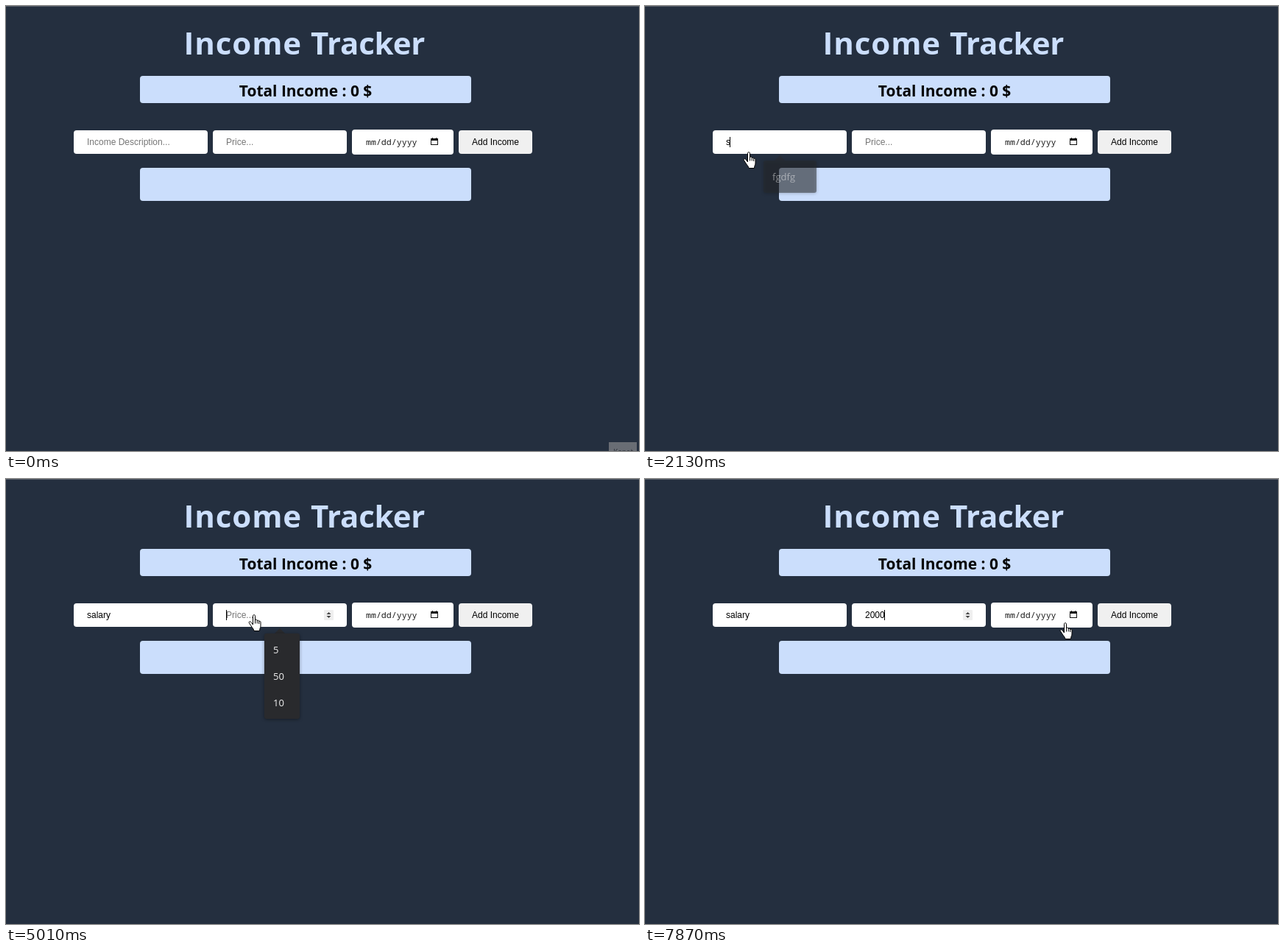
These frames come from a looping animation (860 px wide and 605 px high, 8 s). An HTML page with a canvas:

```html
<!DOCTYPE html>
<html lang="en">
<head>
<meta charset="utf-8">
<title>Income Tracker</title>
<style>
html, body { margin: 0; width: 100%; height: 100%; overflow: hidden; background: #242f3f; }
canvas { display: block; }
</style>
</head>
<body>
<canvas id="stage" width="860" height="605"></canvas>
<script>
const ctx = document.getElementById('stage').getContext('2d');
const LOOP = 8000;
const UI = '12px "Liberation Sans", Arial, sans-serif';
const MENU = '13px "Open Sans", "Noto Sans", sans-serif';
const MONO = '11.6px "Noto Sans Mono", "DejaVu Sans Mono", monospace';
const bold = size => `bold ${size}px "Open Sans", "Noto Sans", sans-serif`;

const HAND = new Path2D('M6 14V2.2C6 .2 9 .2 9 2.2V8C9 6.6 11.7 6.8 11.7 8.4V9C11.7 7.7 14.2 7.9 14.2 9.4V10C14.2 8.9 16.5 9 16.5 10.6V16C16.5 18 15 19 15 22.5H7.5C7.5 20 4.5 18 3 15L.8 11.6C0 10 2 9 3.4 10.6Z');
const KNUCKLES = new Path2D('M9 8V12.5M11.7 9V12.5M14.2 10V13');
const ARROW = new Path2D('M.5 .5V17.5L4.5 13.7L7.2 19.7L9.8 18.6L7.2 12.8H12.5Z');

// Each track holds [start time, value...]; values hold until the next entry.
const cursorTrack = [
  [0, ''],
  [140, 'arrow', 560, 450], [270, 'arrow', 210, 300], [410, 'arrow', 68, 228], [540, 'hand', 145, 174],
  [860, 'hand', 145, 180], [1000, 'hand', 144, 185.5], [1270, 'hand', 143, 190],
  [1410, 'hand', 142, 195], [1550, 'hand', 141, 198], [3860, 'hand', 139, 198],
  [4160, 'arrow', 170, 206], [4300, 'arrow', 280, 228], [4440, 'arrow', 354, 233],
  [4570, 'hand', 342, 192], [4720, 'hand', 337, 184],
  [7430, 'hand', 362, 190], [7570, 'hand', 470, 199], [7720, 'hand', 520, 200], [7870, 'hand', 571, 195]
];
const descTrack = [[0, ''], [2130, 's'], [2260, 'sa'], [2700, 'sal'], [2840, 'sala'], [3160, 'salar'], [3290, 'salary']];
const priceTrack = [[0, ''], [6010, '2'], [6290, '20'], [6440, '200'], [6580, '2000']];
const caretTrack = [
  [0, ''], [1000, 'desc'], [1410, ''], [1830, 'desc'], [3860, ''], [4440, 'desc'],
  [4720, 'price'], [5440, ''], [6010, 'price'], [7150, ''], [7430, 'price']
];
const descMenuTrack = [[0, 0], [1000, 0.5], [1130, 1], [2130, 0.5], [2260, 0]];
const priceMenuTrack = [[0, 0], [4720, 0.6], [5010, 1], [6010, 0.5], [6150, 0]];

function at(track, t) {
  let hit = track[0];
  for (const step of track) if (step[0] <= t) hit = step;
  return hit.slice(1);
}

function box(x, y, w, h, color, r = 4) {
  ctx.fillStyle = color;
  ctx.beginPath();
  ctx.roundRect(x, y, w, h, r);
  ctx.fill();
}

function text(str, x, y, font, color, align = 'left', spacing = 0) {
  ctx.font = font;
  ctx.fillStyle = color;
  ctx.textAlign = align;
  ctx.letterSpacing = spacing + 'px';
  ctx.fillText(str, x, y);
}

function triangle(x, y, half, h, color) {
  ctx.fillStyle = color;
  ctx.beginPath();
  ctx.moveTo(x, y);
  ctx.lineTo(x - half, y + h);
  ctx.lineTo(x + half, y + h);
  ctx.fill();
}

function field(x, value, hint, caret) {
  box(x, 169, 182, 32, '#fff');
  const left = x + 18;
  text(value || hint, left, 189, UI, value ? '#000' : '#757575');
  if (caret) {
    const end = left + (value ? ctx.measureText(value).width : 0);
    ctx.fillStyle = '#000';
    ctx.fillRect(Math.max(left, Math.round(end - 0.6)), 178, 1, 14);
  }
}

function squiggle(x, y, w) {
  ctx.strokeStyle = '#d93a3a';
  ctx.lineWidth = 1;
  ctx.beginPath();
  for (let i = 0; i <= w; i += 2) ctx.lineTo(x + i, y + (i % 4 ? 0.8 : -0.8));
  ctx.stroke();
}

function spinner() {
  box(432, 178, 13, 14, '#efefef', 1);
  triangle(438.5, 181, 3, 3, '#454545');
  triangle(438.5, 189, 3, -3, '#454545');
}

function dateField() {
  box(470, 168, 138, 34, '#fff');
  text('mm/dd/yyyy', 489, 189, MONO, '#1c1c1c');
  ctx.strokeStyle = '#111';
  ctx.lineWidth = 1;
  ctx.strokeRect(577.5, 180.5, 9, 8);
  ctx.fillStyle = '#111';
  ctx.fillRect(577, 180, 10, 3);
  ctx.fillRect(579, 179, 1, 1);
  ctx.fillRect(584, 179, 1, 1);
}

function menu(x, w, tipX, items, alpha) {
  if (!alpha) return;
  ctx.save();
  ctx.globalAlpha = alpha;
  triangle(tipX, 203, 7, 7, '#292a2d');
  ctx.shadowColor = 'rgba(0,0,0,.4)';
  ctx.shadowBlur = 4;
  ctx.shadowOffsetY = 1;
  box(x, 210, w, items.length * 36 + 8, '#292a2d', 3);
  ctx.shadowColor = 'transparent';
  items.forEach((item, i) => text(item, x + 12, 237 + i * 36, MENU, '#f1f1f1'));
  ctx.restore();
}

function cursor(kind, x, y) {
  if (!kind) return;
  const hand = kind === 'hand';
  const shape = hand ? HAND : ARROW;
  ctx.save();
  ctx.translate(hand ? x - 7.5 : x, y);
  ctx.fillStyle = '#fff';
  ctx.strokeStyle = '#000';
  ctx.lineWidth = 1;
  ctx.lineJoin = 'round';
  ctx.fill(shape);
  ctx.stroke(shape);
  if (hand) ctx.stroke(KNUCKLES);
  ctx.restore();
}

function cornerLabel() {
  box(819, 593, 38, 12, '#696d74', 0);
  text('Kapat', 825, 610, '10px "Open Sans", sans-serif', '#2c3038');
}

function draw(t) {
  ctx.fillStyle = '#242f3f';
  ctx.fillRect(0, 0, 860, 605);
  ctx.fillStyle = '#565d68';
  ctx.fillRect(0, 0, 860, 1);

  text('Income', 241.5, 66, bold(42), '#cbdefc', 'left', 0.9);
  text('Tracker', 414, 66, bold(42), '#cbdefc', 'left', -0.2);
  box(182, 95, 450, 37, '#cbdefc');
  text('Total Income : 0 $', 407, 123, bold(20.9), '#050505', 'center');
  box(182, 220, 450, 45, '#cbdefc');

  const [focus] = at(caretTrack, t);
  field(92, at(descTrack, t)[0], 'Income Description...', focus === 'desc');
  if (t >= 4160 && t < 5010) squiggle(110, 190, 32);
  field(281, at(priceTrack, t)[0], 'Price...', focus === 'price');
  if (t >= 4570) spinner();
  dateField();
  box(615, 169, 100, 32, '#f0f0f0');
  text('Add Income', 665, 189, UI, '#000', 'center');

  menu(161, 72, 183, ['fgdfg'], at(descMenuTrack, t)[0]);
  menu(351, 48, 372, ['5', '50', '10'], at(priceMenuTrack, t)[0]);
  if (t < 140) cornerLabel();
  cursor(...at(cursorTrack, t));
}

let start;
function tick(now) {
  start ??= now;
  draw((now - start) % LOOP);
  requestAnimationFrame(tick);
}
draw(0);
requestAnimationFrame(tick);
</script>
</body>
</html>
```
